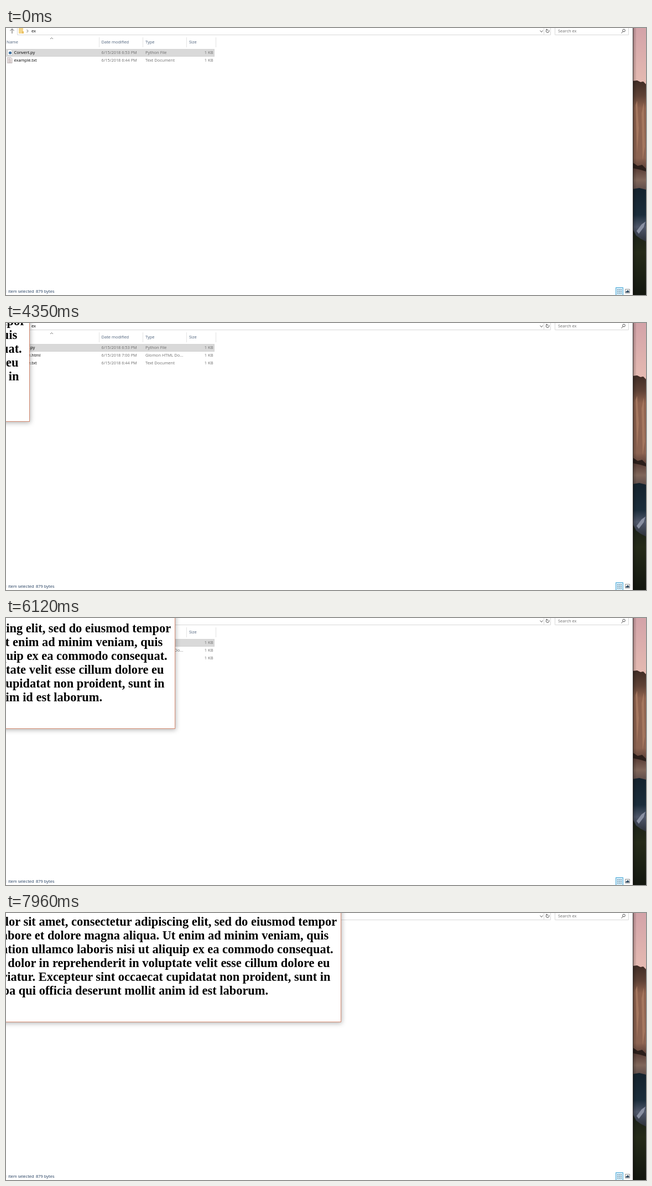
Write an HTML page that moves like this. It is 1157 px wide and 484 px high and loops after 8 s.

```html
<!DOCTYPE html>
<html lang="en">
<head>
<meta charset="utf-8">
<title>Convert</title>
<style>
html, body { margin: 0; height: 100%; overflow: hidden; background: #fff; }
svg { display: block; width: 100vw; height: 100vh; }
text { font: 7.5px "Open Sans", "Noto Sans", sans-serif; white-space: pre; }
.dim { fill: #6d6d6d; }
.date { font-size: 7.35px; }
.head { fill: #4c607a; }
.status { fill: #1e395b; }
.end { text-anchor: end; }
.line { fill: none; stroke: #d9d9d9; }
.ink { fill: none; stroke: #555; }
#page text { font: bold 22.44px "Liberation Serif", "Times New Roman", serif; text-anchor: middle; }
#page rect { fill: #fff; stroke: #d58a70; filter: drop-shadow(1px 2px 4px rgba(0,0,0,.3)); }
</style>
</head>
<body>
<svg viewBox="0 0 1157 484">
  <defs>
    <linearGradient id="sky" x2="0" y2="1">
      <stop stop-color="#d3a3a8"/><stop offset="1" stop-color="#e6bcb2"/>
    </linearGradient>
    <linearGradient id="cliff" x2="0" y2="1">
      <stop stop-color="#3f2c25"/><stop offset=".14" stop-color="#5f4236"/>
      <stop offset=".25" stop-color="#8f624e"/><stop offset=".7" stop-color="#8c6351"/>
      <stop offset=".8" stop-color="#5c4038"/><stop offset=".9" stop-color="#80665a"/>
      <stop offset="1" stop-color="#5a4a48"/>
    </linearGradient>
    <linearGradient id="lake" x2="0" y2="1">
      <stop stop-color="#14222d"/><stop offset=".5" stop-color="#1b2d3b"/>
      <stop offset=".72" stop-color="#4f576a"/><stop offset="1" stop-color="#2b3038"/>
    </linearGradient>
    <linearGradient id="wood" x2="0" y2="1">
      <stop stop-color="#1a2019"/><stop offset=".35" stop-color="#252b19"/><stop offset="1" stop-color="#12160f"/>
    </linearGradient>
    <linearGradient id="shade">
      <stop stop-opacity=".3"/><stop offset="1" stop-opacity="0"/>
    </linearGradient>
  </defs>

  <!-- wallpaper strip -->
  <path fill="url(#sky)" d="M1133 0h24v110h-24z"/>
  <path fill="url(#cliff)" d="M1133 96l8 -1 6 3 5 -1 5 5V296h-24z"/>
  <path fill="#a5775f" d="M1138 140l3 -8 3 50 -3 45zM1149 155l4 -20 2 80 -4 25z"/>
  <path fill="#2b1e1a" d="M1133 244l9 6 8 -2 7 7v5l-10 -3 -14 -3z"/>
  <path fill="url(#lake)" d="M1133 292l12 -2 12 3v95h-24z"/>
  <path fill="#8990a2" d="M1140 368l9 -12 7 -5 -3 10 -9 12z"/>
  <path fill="url(#wood)" d="M1133 364l6 12 8 6 10 5v99h-24z"/>
  <path fill="url(#shade)" d="M1133 0h7v484h-7z"/>
  <path fill="#383434" d="M1133 0h1v484h-1z"/>

  <!-- address bar -->
  <path class="ink" d="M11 10V1.5M7.5 5L11 1.5 14.5 5"/>
  <path class="line" d="M20.500 0V12.500H984.500V0M972.500 0V12M992.500 0V12.500H1125.500V0"/>
  <path fill="#f4d58a" d="M23 0h8v10h-8z"/><path fill="#e9bf62" d="M29 6h3v4h-3z"/>
  <path class="ink" d="M37.500 3L40 5.500 37.500 8M965.500 4.500L968 7.500 970.500 4.500"/>
  <path class="ink" d="M977 3.500a2.800 2.800 0 1 0 4 0M976 2.500h2.500v2.500"/>
  <text x="46" y="8">ex</text>
  <text class="dim" x="998" y="8">Search ex</text>
  <circle class="ink" cx="1117" cy="4.500" r="2.300"/><path class="ink" d="M1115.500 6L1112.500 9.500"/>

  <!-- column heads -->
  <path class="ink" stroke-width=".8" d="M80 20L82.500 17.500 85 20"/>
  <path class="line" stroke-opacity=".7" d="M168.500 17V35M247.500 17V35M326.500 17V35M379.500 17V35"/>
  <g class="head">
    <text x="1" y="28">Name</text><text x="172.500" y="28">Date modified</text>
    <text x="252" y="28">Type</text><text x="331" y="28">Size</text>
  </g>

  <rect id="mark" x="-1" y="38.500" width="377.500" height="13"/>
  <g id="py">
    <path fill="#fff" stroke="#b5b5b5" stroke-width=".6" d="M3 39.500h6l2 2v8H3z"/>
    <circle cx="7.500" cy="45" r="2.600" fill="#3b6f9e"/>
  </g>
  <g id="html"><circle cx="7" cy="44.500" r="4.300" fill="#dd5144"/></g>
  <g id="txt">
    <path fill="#f3eeee" stroke="#a99c9c" stroke-width=".7" d="M2.500 39.500h6l2.500 2v8H2.500z"/>
    <path stroke="#a08f8f" stroke-width=".7" d="M4 42h4M4 44h5.500M4 46h5.500M4 48h5.500"/>
  </g>

  <!-- status bar -->
  <g class="status">
    <text x="-2.500" y="480">1</text><text x="4" y="480">item selected</text><text x="54" y="480">879 bytes</text>
  </g>
  <path fill="#cde8f6" stroke="#4aa9d8" d="M1102.500 470.500h13v14h-13z"/>
  <path stroke="#4d6f86" stroke-width=".9" stroke-dasharray="2 1" d="M1105 474.500h9M1105 477.500h9M1105 480.500h9"/>
  <path fill="#fff" stroke="#777" stroke-width=".8" d="M1119.500 473.500h8v7h-8z"/>
  <path fill="#2f4a63" d="M1120.500 479.500v-2l2 -1 1.500 -1.500 2.500 2v2.500z"/>

  <rect id="console" x="-10" y="-10" width="651" height="301"/>
  <g id="page"><rect x="-770.500" y="-300" width="771" height="300.500"/></g>
  <path id="cursor" fill="#fff" stroke="#000" stroke-width=".8" d="M.5 .5V10L2.600 8 4.200 11.800 5.800 11.100 4.200 7.500H7.200z"/>
</svg>
<script>
const LOOP = 8000, TICK = 77.35;
const el = id => document.getElementById(id);
const show = (id, on) => el(id).style.display = on ? '' : 'none';
const move = (id, x, y) => el(id).setAttribute('transform', `translate(${x} ${y})`);

function addText(parent, x, y, str, cls = '') {
  const t = document.createElementNS('http://www.w3.org/2000/svg', 'text');
  t.setAttribute('x', x);
  t.setAttribute('y', y);
  t.setAttribute('class', cls);
  t.textContent = str;
  parent.append(t);
}

for (const [id, name, time, type] of [
  ['py', 'Convert.py', '6:53', 'Python File'],
  ['html', 'example.html', '7:00', 'Glomon HTML Do...'],
  ['txt', 'example.txt', '6:44', 'Text Document']
]) {
  addText(el(id), 14.5, 47.3, name);
  addText(el(id), 172.5, 47.3, `6/15/2018 ${time} PM`, 'dim date');
  addText(el(id), 252, 47.3, type, 'dim');
  addText(el(id), 374.5, 47.3, '1 KB', 'dim end');
}

[
  'Lorem ipsum dolor sit amet, consectetur adipiscing elit, sed do eiusmod tempor',
  'incididunt ut labore et dolore magna aliqua. Ut enim ad minim veniam, quis',
  'nostrud exercitation ullamco laboris nisi ut aliquip ex ea commodo consequat.',
  'Duis aute irure dolor in reprehenderit in voluptate velit esse cillum dolore eu',
  'fugiat nulla pariatur. Excepteur sint occaecat cupidatat non proident, sunt in',
  'culpa qui officia deserunt mollit anim id est laborum.'
].forEach((line, i) => addText(el('page'), -385.5, -174 + 25 * i, line));

// Keys are [tick, x, y]
const cursorPath = [[1, 1011, 446], [3, 640, 270], [5, 280, 110], [7, 110, 18], [8, 78, 36],
  [9, 68, 42], [28, 68, 42], [29, 38, 51]];
const pagePath = [[50, 1, 172], [56, 42, 178], [60, 79, 181], [64, 113, 190], [65, 113, 190],
  [69, 151, 188], [70, 151, 188], [71, 162, 189], [81, 341, 203], [87, 404, 203],
  [92, 448, 199], [95, 470, 197], [103, 605, 197]];

function along(path, k) {
  const i = path.findIndex(p => p[0] >= k);
  if (i < 0) return path[path.length - 1].slice(1);
  if (i === 0) return path[0].slice(1);
  const a = path[i - 1], b = path[i], f = (k - a[0]) / (b[0] - a[0]);
  return [1, 2].map(n => Math.round(a[n] + (b[n] - a[n]) * f));
}

function draw(now) {
  const k = Math.floor((now % LOOP + 8) / TICK);

  const active = k >= 9 && k < 40;
  el('mark').setAttribute('fill', active ? '#cce8ff' : '#d9d9d9');
  el('mark').setAttribute('stroke', active ? '#99d1ff' : '#d4d4d4');

  const sorted = k >= 50;
  show('html', k >= 24);
  move('html', 0, sorted ? 14 : 28);
  move('txt', 0, sorted ? 28 : 14);

  show('console', k >= 16 && k < 19);
  el('console').setAttribute('opacity', k === 17 ? 1 : 0.4);

  show('cursor', k >= 1 && k < 30);
  move('cursor', ...along(cursorPath, k));

  show('page', k >= 50);
  move('page', ...along(pagePath, k));

  requestAnimationFrame(draw);
}
requestAnimationFrame(draw);
</script>
</body>
</html>
```
